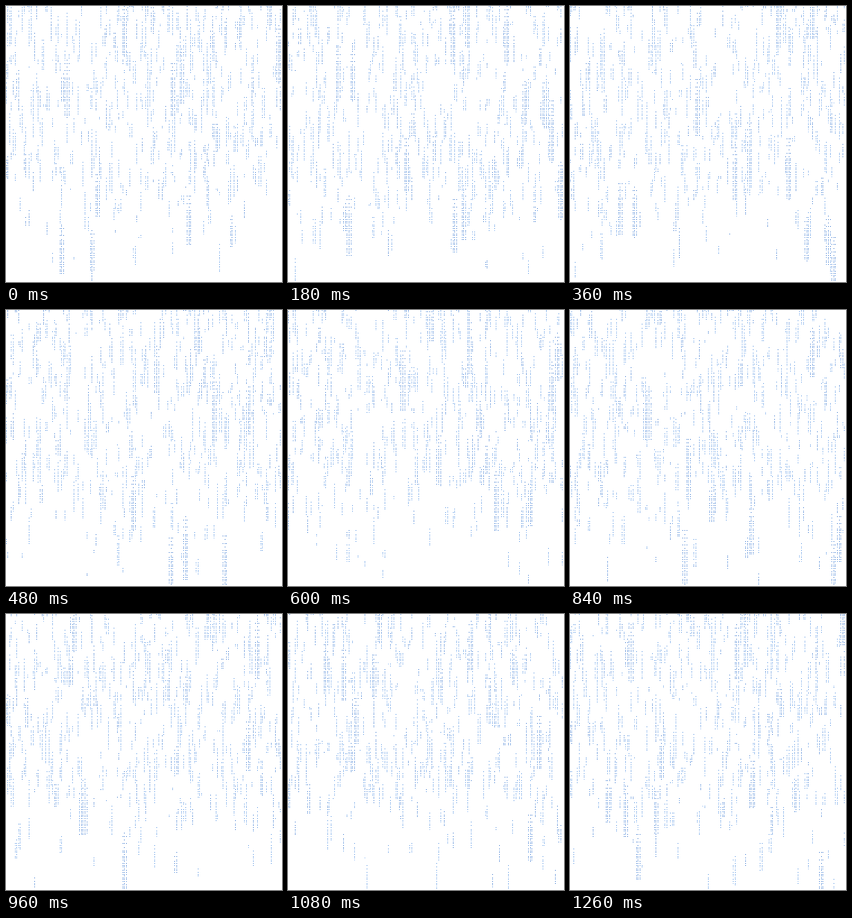
These frames come from a looping animation (400x400 px, 1320 ms). An HTML page with a canvas:

```html
<!DOCTYPE html>
<html lang="en">
<head>
<meta charset="utf-8">
<title>Rain</title>
<style>
  html, body { margin: 0; width: 100%; height: 100%; overflow: hidden; background: #fff; }
  canvas { display: block; width: 400px; height: 400px; image-rendering: pixelated; }
</style>
</head>
<body>
<canvas id="rain" width="400" height="400"></canvas>
<script>
const SIZE = 400, STEP_MS = 60, STEPS = 22, PITCH = 2.6, LEAD = 100;
const COUNT = 2100, GOLDEN = 0.6180339887;
const SHADES = ['#86b4f0', '#4f8fe0', '#2f6fcb'];
const ctx = document.getElementById('rain').getContext('2d');

let seed = 20731;
function rand() {
  seed = (seed + 0x6d2b79f5) | 0;
  let t = Math.imul(seed ^ (seed >>> 15), seed | 1);
  t ^= t + Math.imul(t ^ (t >>> 7), t | 61);
  return ((t ^ (t >>> 14)) >>> 0) / 4294967296;
}

// Near drops are longer, wider and faster, and reach further down.
function makeDrop(_, i) {
  const kind = rand();
  const near = kind > 0.98;
  const mid = !near && kind > 0.7;
  const speed = near ? 66 : mid ? 62 : 56;
  return {
    speed,
    col: Math.floor(rand() * SIZE / PITCH),
    start: (i * GOLDEN % 1) * speed * STEPS,
    length: near ? 55 + rand() * 40 : mid ? 20 + rand() * 28 : 4 + rand() * 24,
    width: near ? 3 : rand() < (mid ? 0.35 : 0.12) ? 2 : 1,
    ground: near ? 300 + rand() * 110 : 250 + 140 * rand() ** 2.4,
    phase: Math.floor(rand() * 4),
    shade: near || rand() < 0.25 ? 2 : 1
  };
}

const drops = Array.from({ length: COUNT }, makeDrop);

// The drop thins out towards its tail and its side columns.
function drawDrop(d, step) {
  const top = (d.start + step * d.speed) % (d.speed * STEPS) - LEAD;
  if (top > d.ground || top + d.length < 0) return;
  const first = Math.max(0, Math.ceil(top / PITCH));
  const last = Math.min(SIZE, top + d.length) / PITCH;
  for (let row = first; row < last; row++) {
    const along = (row * PITCH - top) / d.length;
    for (let i = 0; i < d.width; i++) {
      const beat = (row + d.phase + 2 * i) % 4;
      if (i !== 1 && d.width > 1 && beat === 0) continue;
      if (along < 0.3 && beat % 2) continue;
      ctx.fillStyle = SHADES[beat === 3 ? d.shade - 1 : d.shade];
      ctx.fillRect(Math.floor((d.col + i) * PITCH), Math.floor(row * PITCH), 1, 1);
    }
  }
}

let shown = -1;
function frame() {
  const step = Math.floor(performance.now() / STEP_MS) % STEPS;
  if (step !== shown) {
    shown = step;
    ctx.fillStyle = '#fff';
    ctx.fillRect(0, 0, SIZE, SIZE);
    for (const d of drops) drawDrop(d, step);
  }
  requestAnimationFrame(frame);
}
frame();
</script>
</body>
</html>
```
